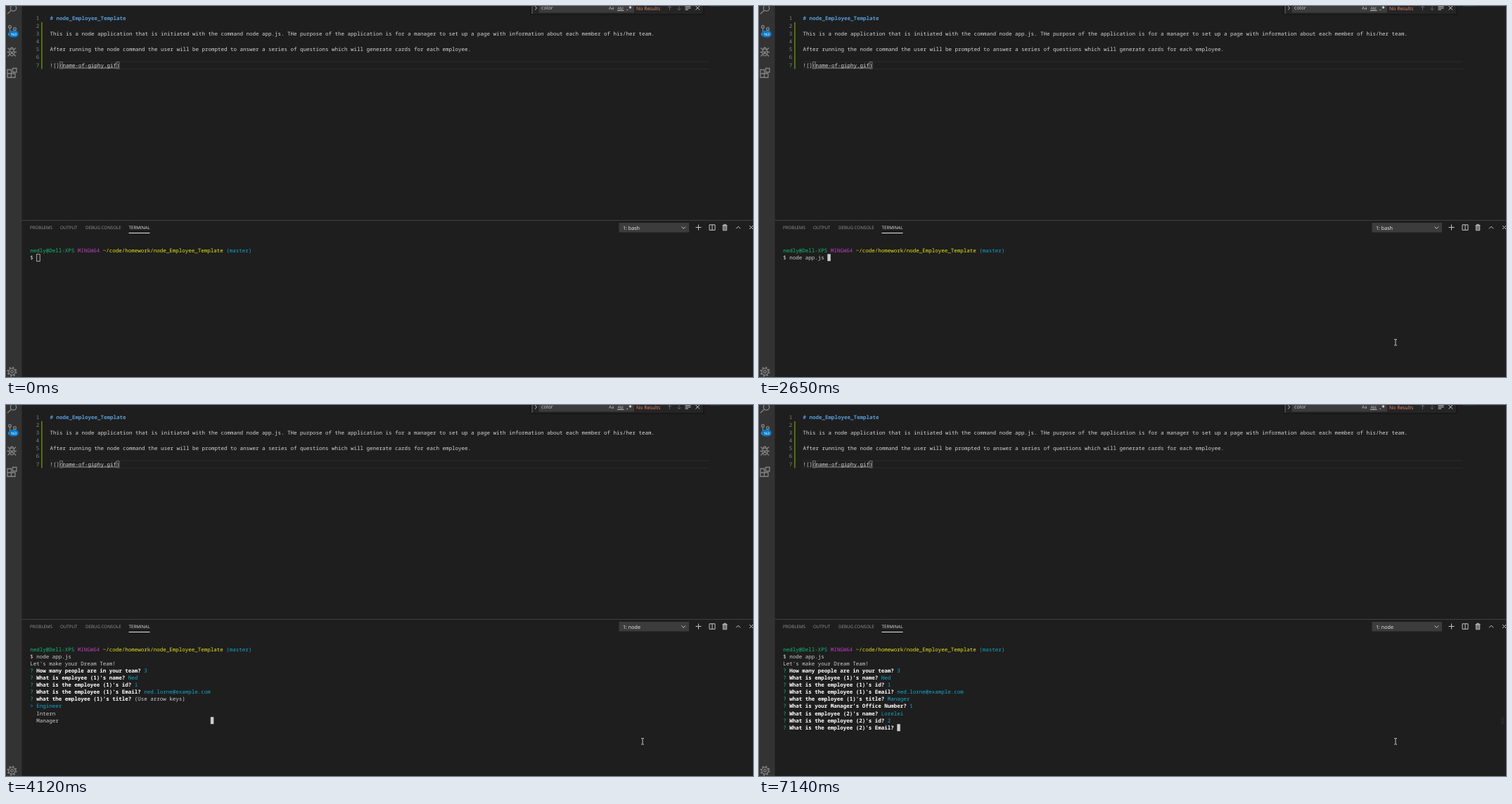
Write an HTML page that moves like this. It is 1062 px wide and 527 px high and loops after 8000 ms.

```html
<!DOCTYPE html>
<html lang="en">
<head>
<meta charset="utf-8">
<title>Terminal session</title>
<style>
html, body { margin: 0; width: 100%; height: 100%; overflow: hidden; background: #1e1e1e; }
svg { display: block; width: 1062px; height: 527px; }
text { white-space: pre; text-rendering: geometricPrecision; }
.mono { font: 7.5px "Noto Sans Mono", "DejaVu Sans Mono", monospace; fill: #d4d4d4; }
.ui { font: 6.2px "Open Sans", "Noto Sans", sans-serif; fill: #979797; }
.num { fill: #858585; text-anchor: end; }
.line { fill: none; stroke: #c5c5c5; stroke-width: 1; }
.dim { fill: none; stroke: #848484; stroke-width: 1.3; }
.green { fill: #0dbc79; }
.pink { fill: #bc3fbc; }
.yellow { fill: #e5e510; }
.cyan { fill: #11a8cd; }
.bold { fill: #fff; font-weight: bold; }
.head { fill: #569cd6; font-weight: bold; }
</style>
</head>
<body>
<svg viewBox="0 0 1062 527">
  <rect width="1062" height="527" fill="#1e1e1e"/>

  <!-- activity bar -->
  <rect width="22.5" height="527" fill="#333"/>
  <g class="dim">
    <circle cx="10.5" cy="3" r="4.2"/>
    <path d="M7.4 6.2L2 11.3"/>
    <circle cx="5.5" cy="29.5" r="1.9"/>
    <circle cx="12.5" cy="32.5" r="1.9"/>
    <circle cx="5.5" cy="40" r="1.9"/>
    <path d="M5.5 31.5V38M12.5 34.5Q12 37 6 37"/>
    <ellipse cx="8.3" cy="66" rx="3.6" ry="4.8"/>
    <path d="M5.5 61.5Q8.3 56.500 11 61.500M1.500 65.500H5M11.500 65.500H15M2.500 59.500L5.500 62.500M14 59.500L11 62.500M2.500 71.500L5.500 68.500M14 71.500L11 68.500M6 64L10.500 68.500M10.500 64L6 68.500"/>
    <path d="M2 90.500H7.500V101.500H2ZM2 96H13V101.500H7.500M9.500 88.500H15V94H9.500Z"/>
    <circle cx="8.500" cy="519.500" r="4.600"/>
    <circle cx="8.500" cy="519.500" r="1.800"/>
    <circle cx="8.500" cy="519.500" r="6.100" stroke-width="1.800" stroke-dasharray="2.200 2.591"/>
  </g>
  <rect x="3.800" y="35" width="14" height="9.400" rx="4.700" fill="#007acc"/>
  <text class="ui" x="10.800" y="41.600" text-anchor="middle" style="font-size:5px;font-weight:600;fill:#fff">163</text>

  <!-- editor -->
  <path d="M62 79H1000M62 89.300H1000" stroke="#2b2b2b"/>
  <rect x="50" y="23" width="1.700" height="66.500" fill="#587c0c"/>
  <g id="editor" class="mono"></g>
  <path d="M80.500 88H157" stroke="#bbb" stroke-width=".8"/>
  <path d="M76.500 79.500h4v9.500h-4zM157 79.500h4v9.500h-4z" fill="none" stroke="#888" stroke-width=".8"/>
  <path d="M1001 .3H1017" stroke="#27506a" stroke-width=".7"/>
  <path d="M1017 .3H1062" stroke="#2c2a4a" stroke-width=".7"/>

  <!-- find box -->
  <rect x="745" width="248" height="13" fill="#181818"/>
  <rect x="747" width="244" height="11" fill="#252526"/>
  <rect x="747" width="2" height="11" fill="#454545"/>
  <rect x="757.500" width="135.500" height="9.500" fill="#3c3c3c"/>
  <path class="line" d="M752 .3L754.700 2.900L752 5.500"/>
  <g class="ui">
    <text x="761" y="5.300" style="font-size:7.150px;fill:#ccc">color</text>
    <text x="857" y="5.200" style="fill:#c5c5c5">Aa</text>
    <text x="869.500" y="5" style="font-size:5.500px;fill:#c5c5c5">Abl</text>
    <text x="896" y="5.500" style="font-size:6.900px;fill:#f48771">No Results</text>
  </g>
  <path class="line" d="M869 6.300H878.500M882.500 5.500h1.500M887.500 0V4M885.700 1L889.300 3M889.300 1L885.700 3M965.500 .8H973.500M965.500 3H973.500M965.500 5.200H970M980.500 0L986 5.500M986 0L980.500 5.500" stroke-width=".9"/>
  <path class="line" d="M943.500 6V0M941 2.500L943.500 0L946 2.500M957 0V6M954.500 3.500L957 6L959.500 3.500" style="stroke:#606060"/>

  <!-- panel header -->
  <path d="M22.500 304.500H1062" stroke="#414141"/>
  <g class="ui">
    <text x="34" y="317.200">PROBLEMS</text>
    <text x="77" y="317.200">OUTPUT</text>
    <text x="113" y="317.200">DEBUG CONSOLE</text>
    <text x="174.600" y="317.200" style="fill:#e7e7e7">TERMINAL</text>
    <rect x="174.500" y="322" width="30" height="1" fill="#e7e7e7"/>
    <rect x="871.500" y="308" width="99.500" height="13.500" fill="#3c3c3c"/>
    <text id="shell" x="877" y="318" style="font-size:7.150px;fill:#f0f0f0"></text>
  </g>
  <path class="line" d="M960.500 313.500L963.300 316.300L966 313.500M980.500 314.500H988.500M984.500 310.500V318.500M1000 310.800H1008V318.300H1000ZM1004 310.800V318.300M1018.500 311.800H1025.500M1020.500 311.500V310.300H1023.500V311.500M1038 316.300L1041 313.200L1044 316.300M1057 312L1062 317M1062 312L1057 317"/>
  <path d="M1019.300 312H1024.700V318.800H1019.300Z" fill="#777" stroke="#c5c5c5" stroke-width=".8"/>

  <!-- terminal -->
  <rect id="scroll" x="1055" y="443" width="4" height="11" fill="#262626"/>
  <g id="term" class="mono" style="fill:#ccc"></g>
  <rect id="cursor" width="4.500" height="10" stroke="#ccc"/>
  <path id="mouse" class="line" d="M903 473.500H904.300L905 474L905.700 473.500H907M905 474V481.500M903 482H904.300L905 481.500L905.700 482H907" stroke-width=".9"/>
</svg>
<script>
const $ = id => document.getElementById(id);
const span = (cls, s) => `<tspan class="${cls}">${s}</tspan>`;
const LOOP = 8000, LEFT = 34.3, CHAR = 4.5, ROW = 10.1;

const page = [
  span('head', '# node_Employee_Template'), '',
  'This is a node application that is initiated with the command node app.js. THe purpose of the application is for a manager to set up a page with information about each member of his/her team.', '',
  'After running the node command the user will be prompted to answer a series of questions which will generate cards for each employee.', '',
  '![](name-of-giphy.gif)'
];
$('editor').innerHTML = page.map((s, i) => {
  const y = 19.6 + 11.15 * i;
  return `<text class="num" x="47.300" y="${y}">${i + 1}</text><text x="62.500" y="${y}">${s}</text>`;
}).join('');

const prompt = [
  span('green', 'nedly@Dell-XPS'), span('pink', 'MINGW64'),
  span('yellow', '~/code/homework/node_Employee_Template'), span('cyan', '(master)')
].join(' ');
const intro = ['$ node app.js', "Let's make your Dream Team!"];
const email = 'ned.lorne@example.com';
const questions = [
  ['How many people are in your team?', '3'],
  ["What is employee (1)'s name?", 'Ned'],
  ["What is the employee (1)'s id?", '1'],
  ["What is the employee (1)'s Email?", email],
  ["what the employee (1)'s title?", 'Manager'],
  ["What is your Manager's Office Number?", '1'],
  ["What is employee (2)'s name?", 'Lorelei'],
  ["What is the employee (2)'s id?", '2'],
  ["What is the employee (2)'s Email?", '']
];
const ask = ([q, a]) => `${span('green', '?')} ${span('bold', q)} ${span('cyan', a)}`;

// Each state: start time, lines below the prompt, cursor row and column.
const type = (at, s) => [at, ['$ ' + s], 1, 2 + s.length];
const asking = (n, extra) =>
  [...intro, ...questions.slice(0, n).map(ask), ask([questions[n][0], '']) + extra];
const step = (at, n, typed = '') =>
  [at, asking(n, typed), n + 3, questions[n][0].length + 3 + typed.length];
const menu = (at, pick, col, hint = '') => [at, [
  ...asking(4, hint),
  ...['Engineer', 'Intern', 'Manager'].map((s, i) => i === pick ? span('cyan', '&gt; ' + s) : '  ' + s)
], 10, col];

const states = [
  type(0, ''), type(570, 'n'), type(650, 'no'), type(800, 'nod'), type(880, 'node'),
  type(1570, 'node '), type(1800, 'node a'), type(1870, 'node ap'), type(2650, 'node app.js '),
  [3040, intro.slice(0, 1), 2, 0],
  step(3320, 0), step(3730, 1), step(3810, 2), step(3880, 3), step(3960, 3, email),
  menu(4120, 0, 57, '(Use arrow keys)'), menu(5660, 1, 33), menu(5820, 2, 33),
  step(5970, 6), step(6040, 7), step(6970, 7, '2'), step(7140, 8)
];

const show = (id, on) => $(id).setAttribute('visibility', on ? 'visible' : 'hidden');
let shown;

function draw() {
  const t = performance.now() % LOOP;
  const state = states.findLast(s => s[0] <= t);
  if (state !== shown) {
    const [, lines, row, col] = shown = state;
    $('term').innerHTML = [prompt, ...lines].map((s, i) =>
      `<text x="${LEFT}" y="${349.6 + ROW * i}">${s}</text>`).join('');
    const hollow = t < 570, inset = hollow ? 0.4 : 0, cursor = $('cursor');
    cursor.setAttribute('x', LEFT + CHAR * col + inset);
    cursor.setAttribute('y', 342.2 + ROW * row + inset);
    cursor.setAttribute('fill', hollow ? 'none' : '#ccc');
    cursor.setAttribute('stroke-width', hollow ? 0.8 : 0);
  }
  $('shell').textContent = t < 3090 ? '1: bash' : '1: node';
  show('mouse', t >= 570);
  show('scroll', t >= 5970);
  requestAnimationFrame(draw);
}
draw();
</script>
</body>
</html>
```
